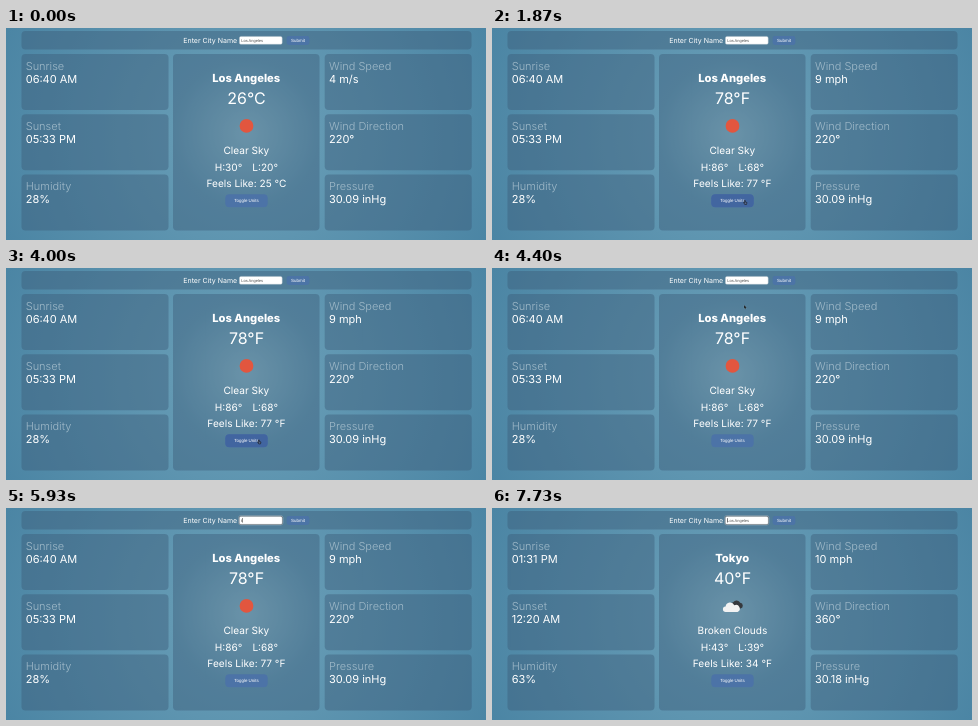
Write an HTML page that moves like this. It is 480 by 212 pixels and loops after 8000 ms.

```html
<!DOCTYPE html>
<html lang="en">
<head>
<meta charset="utf-8">
<title>Weather dashboard</title>
<style>
  html, body { margin: 0; width: 100%; height: 100%; overflow: hidden; background: #4d86a5; }
  svg { display: block; width: 100vw; height: 100vh; }
  text { font-family: Inter, sans-serif; fill: #fff; text-rendering: geometricPrecision; }
  .label { font-size: 11px; font-weight: 300; fill: #9fb9c8; }
  .value { font-size: 11px; }
  .mid { text-anchor: middle; font-size: 10.1px; }
  .ui { font-family: "Liberation Sans", Arial, sans-serif; font-size: 4.44px; }
</style>
</head>
<body>
<svg viewBox="0 0 480 212" preserveAspectRatio="none">
  <defs>
    <radialGradient id="sky" gradientUnits="userSpaceOnUse" cx="240" cy="106" r="262">
      <stop offset="0" stop-color="#8cbccd"/>
      <stop offset=".28" stop-color="#6399b3"/>
      <stop offset="1" stop-color="#4b85a4"/>
    </radialGradient>
  </defs>
  <rect width="480" height="212" fill="url(#sky)"/>
  <g id="cards" fill="#3a5a75" fill-opacity=".42"></g>
  <g id="facts"></g>

  <text x="177.3" y="15" font-size="7">Enter City Name</text>
  <rect id="ring" x="232.7" y="7.7" width="44.2" height="9.2" rx="2" fill="#37424c" stroke="#dfe8ee" stroke-width=".35"/>
  <rect x="233.4" y="8.4" width="42.800" height="7.900" rx="1.5" fill="#fff" stroke="#a9b8c2" stroke-width=".4"/>
  <text id="field" class="ui" x="235.2" y="13.8" style="font-size:4px"></text>
  <rect id="caret" y="10" width=".5" height="4.6" fill="#222"/>
  <rect x="280.6" y="8" width="22.8" height="9" rx="2.4" fill="#4c74a6"/>
  <text class="ui" x="292" y="14" text-anchor="middle">Submit</text>

  <text id="city" class="mid" x="240.2" y="53.5" style="font-size:11.2px;font-weight:800"></text>
  <text id="temp" class="mid" x="240.5" y="76" style="font-size:16px"></text>
  <circle id="sun" cx="240.5" cy="97.900" r="6.900" fill="#e2563f"/>
  <g id="clouds">
    <path d="M238.500 97a3 3 0 0 1 2.700-2.800a4 4 0 0 1 7 .6a2.900 2.900 0 0 1 .4 5.700H240z" fill="#36393d"/>
    <path d="M233.800 104a2.800 2.800 0 0 1-.2-5.600a4.600 4.600 0 0 1 8.700-1.200a3.500 3.500 0 0 1 3.300 6.800z" fill="#f2f2f2"/>
  </g>
  <text id="sky-text" class="mid" x="240.4" y="126"></text>
  <text id="high" class="mid" x="222.500" y="142.500"></text>
  <text id="low" class="mid" x="259.2" y="142.500"></text>
  <text id="feels" class="mid" x="240.4" y="159"></text>
  <rect id="toggle" x="219.300" y="166.300" width="42.400" height="13" rx="4" fill="#4c73a7"/>
  <rect id="hover" x="219.300" y="166.300" width="42.400" height="13" rx="4" fill="#4266a0"/>
  <text class="ui" x="240.5" y="174.300" text-anchor="middle">Toggle Units</text>

  <path id="arrow" d="M0 0V3.800L.9 3L1.500 4.300L2.100 4L1.500 2.800H2.700Z" fill="#111" stroke="#9fb9c8" stroke-width=".2"/>
  <path id="hand" d="M0 0V2.400L-.9 2L.2 4H2L2.500 2L.8 1.500V0Z" fill="#56688c" stroke="#111" stroke-width=".5"/>
  <path id="beam" d="M-.8 -2.200H.8M0 -2.200V2.200M-.8 2.200H.8" fill="none" stroke="#222" stroke-width=".4"/>
</svg>
<script>
const LOOP = 8000;
const $ = id => document.getElementById(id);
const NS = 'http://www.w3.org/2000/svg';

function add(parent, tag, attrs, text = '') {
  const el = document.createElementNS(NS, tag);
  for (const k in attrs) el.setAttribute(k, attrs[k]);
  el.textContent = text;
  return $(parent).appendChild(el);
}

const card = (x, y, width, height) => add('cards', 'rect', { x, y, width, height, rx: 4 });
card(15.5, 3, 450, 18.5);
card(167, 26, 146.5, 176.5);

const labels = ['Sunrise', 'Sunset', 'Humidity', 'Wind Speed', 'Wind Direction', 'Pressure'];
const values = labels.map((name, i) => {
  const right = i > 2, x = right ? 323 : 19.7, y = 26 + (i % 3) * 60.3;
  card(right ? 318.7 : 15.5, y, 147, 56);
  add('facts', 'text', { class: 'label', x, y: y + 15.5 }, name);
  return add('facts', 'text', { class: 'value', x, y: y + 28.8 });
});

const la = { city: 'Los Angeles', sky: 'Clear Sky', facts: ['06:40 AM', '05:33 PM', '28%'], dir: '220°', press: '30.09 inHg' };
const metric = { ...la, temp: '26°C', high: 30, low: 20, feels: '25 °C', wind: '4 m/s' };
const imperial = { ...la, temp: '78°F', high: 86, low: 68, feels: '77 °F', wind: '9 mph' };
const tokyo = {
  city: 'Tokyo', sky: 'Broken Clouds', facts: ['01:31 PM', '12:20 AM', '63%'], dir: '360°', press: '30.18 inHg',
  temp: '40°F', high: 43, low: 39, feels: '34 °F', wind: '10 mph'
};

const reports = [[0, metric], [1870, imperial], [2730, metric], [3800, imperial], [7200, tokyo]];
const typing = [[0, ''], [5930, 't'], [6130, 'to'], [6330, 'tok'], [6430, 'toky'], [6530, 'tokyo'], [7000, '']];
// Pointer stops: time, x, y
const stops = [[70, 294, 13], [200, 247, 184], [400, 247, 184], [600, 249, 173], [1330, 249, 173],
  [1670, 252.5, 172.5], [4000, 252.5, 172.5], [4800, 252, 12.5], [LOOP, 252, 12.5]];
const HOVER_IN = 400, HOVER_OUT = 4000, FADE = 200, FOCUS = 4940, BLINK = 530;

const latest = (list, t) => list.filter(e => e[0] <= t).pop();
const show = (id, on) => $(id).setAttribute('visibility', on ? 'visible' : 'hidden');
const ramp = (t, from) => Math.min(1, Math.max(0, (t - from) / FADE));

function pointer(t) {
  const n = stops.findIndex(s => s[0] > t);
  if (n < 1) return stops[0].slice(1);
  const [a, b] = [stops[n - 1], stops[n]];
  const p = (t - a[0]) / (b[0] - a[0]), e = 1 - (1 - p) ** 2.7;
  return [a[1] + (b[1] - a[1]) * e, a[2] + (b[2] - a[2]) * e];
}

function drawReport(r) {
  $('city').textContent = r.city;
  $('temp').textContent = r.temp;
  $('sky-text').textContent = r.sky;
  $('high').textContent = `H:${r.high}°`;
  $('low').textContent = `L:${r.low}°`;
  $('feels').textContent = `Feels Like: ${r.feels}`;
  [...r.facts, r.wind, r.dir, r.press].forEach((v, i) => values[i].textContent = v);
  show('sun', r !== tokyo);
  show('clouds', r === tokyo);
}

function drawField(t) {
  const [since, typed] = latest(typing, t);
  const focus = t >= FOCUS;
  const field = $('field');
  field.textContent = typed || 'Los Angeles';
  field.style.fill = typed ? '#222' : '#555';
  show('ring', focus);
  // The caret restarts its blink with each key, but not on submit
  const start = since >= 7000 ? 6530 : Math.max(since, FOCUS);
  show('caret', focus && Math.floor((t - start) / BLINK) % 2 === 0);
  $('caret').setAttribute('x', 235 + (typed ? field.getComputedTextLength() + .3 : 0));
}

function drawPointer(t) {
  const [x, y] = pointer(t);
  const over = x > 219 && x < 262 && y > 166 && y < 179.5;
  const inField = t > HOVER_OUT && y < 17;
  $('hover').setAttribute('opacity', ramp(t, HOVER_IN) - ramp(t, HOVER_OUT));
  for (const id of ['arrow', 'hand', 'beam']) $(id).setAttribute('transform', `translate(${x} ${y})`);
  show('arrow', t >= 70 && !over && !inField);
  show('hand', over);
  show('beam', inField && t < 5930);
}

function draw(t) {
  drawReport(latest(reports, t)[1]);
  drawField(t);
  drawPointer(t);
}

function tick() {
  draw(performance.now() % LOOP);
  requestAnimationFrame(tick);
}
draw(0);
tick();
</script>
</body>
</html>
```
